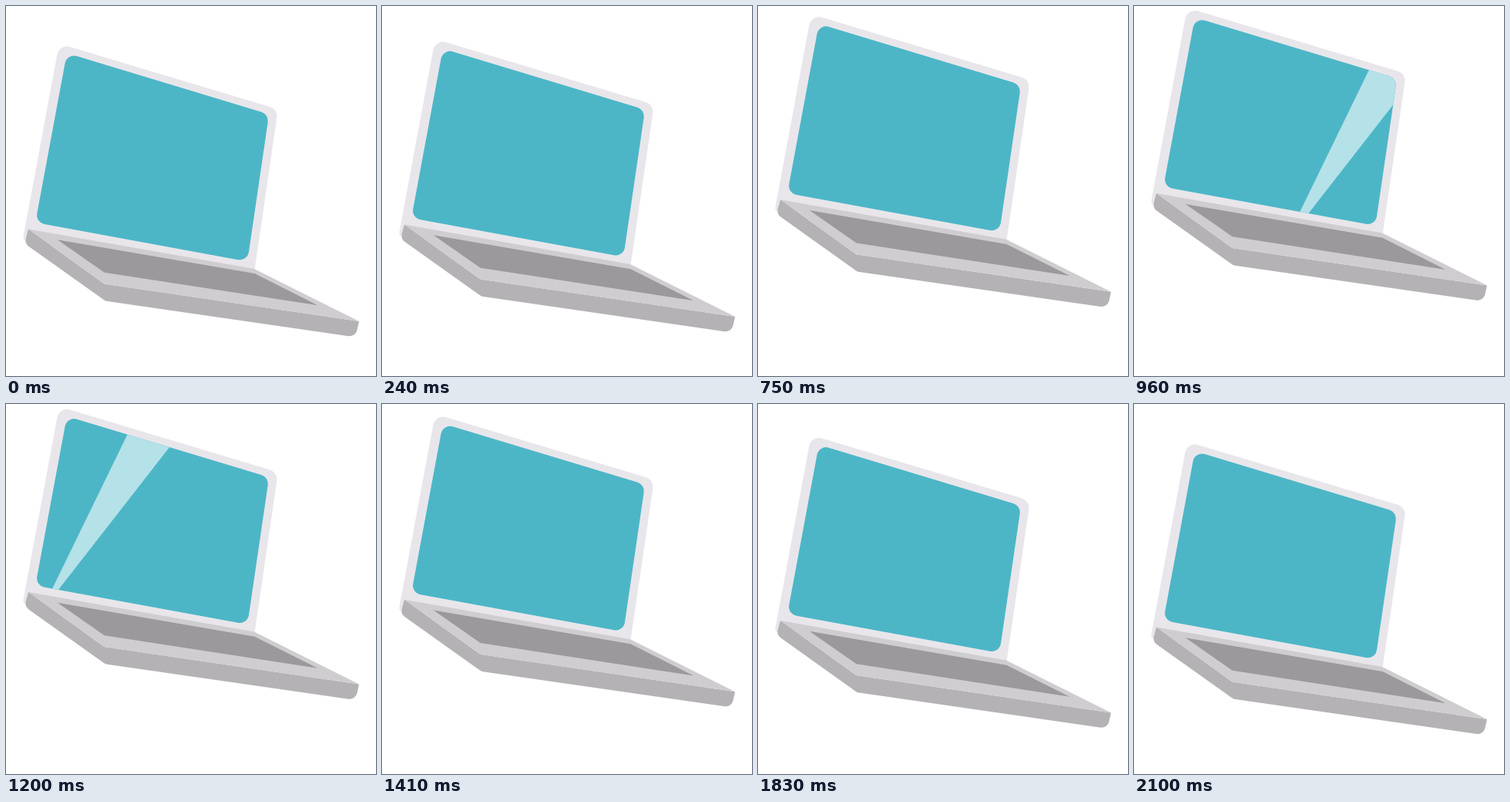
Write an HTML page with a canvas that moves like this. It is 480 by 480 pixels and loops after 2.13 s.

```html
<!DOCTYPE html>
<html lang="en">
<head>
<meta charset="utf-8">
<title>Floating laptop</title>
<style>
html, body { margin: 0; width: 100%; height: 100%; overflow: hidden; background: #fff; }
canvas { display: block; width: 100vmin; height: 100vmin; }
</style>
</head>
<body>
<canvas id="stage" width="480" height="480"></canvas>
<script>
const ctx = document.getElementById('stage').getContext('2d');
const LOOP = 2130, STEP = 30, RISE = 47.4;

const mix = (a, b, t) => a.map((v, i) => v + (b[i] - v) * t);

// Corners of the deck: back left, back right, front right, front left.
const deck = [[29, 289.5], [322, 341], [458, 409], [127.5, 360.5]];
const onDeck = (u, v) =>
  mix(mix(deck[0], deck[3], v), mix(deck[1], deck[2], v), u);
const keys = [onDeck(0.082, 0.135), onDeck(0.94, 0.135),
              onDeck(0.945, 0.735), onDeck(0.082, 0.735)];

const lid = [[69, 48.8], [353, 134], [322, 346], [21.5, 304.5]];
const screen = [[79, 61.2], [341.2, 140.4], [313.2, 331.4], [38.1, 280.9]];
const side = [deck[0], deck[3], deck[2], [453.5, 429.5], [129, 382.7], [24, 308]];

// Outline with rounded corners; radius may differ per corner.
function trace(points, radius = () => 0) {
  const n = points.length;
  ctx.beginPath();
  ctx.moveTo(...mix(points[0], points[n - 1], 0.5));
  points.forEach((p, i) => ctx.arcTo(...p, ...points[(i + 1) % n], radius(i)));
  ctx.closePath();
}

function fill(points, color, radius) {
  trace(points, radius);
  ctx.fillStyle = color;
  ctx.fill();
}

const screenRadius = () => 12;
const lidRadius = i => i < 2 ? 13 : 5;
const sideRadius = i => i < 3 ? 0 : 10;

// A wedge of light whose tip slides along the tilt of the screen.
function drawShine(time) {
  const shift = (time - 960) / 240;
  const x = 194 - 149 * shift, y = 357 - 41 * shift, h = 420;
  ctx.save();
  trace(screen, screenRadius);
  ctx.clip();
  fill([[x, y], [x + h * 0.487, y - h], [x + h * 0.779, y - h]], '#b5e1e8');
  ctx.restore();
}

function draw(time) {
  const lift = RISE * (1 - Math.cos((time + 5) / LOOP * Math.PI * 2)) / 2;
  ctx.fillStyle = '#fff';
  ctx.fillRect(0, 0, 480, 480);
  ctx.save();
  ctx.translate(0, -lift);
  fill(lid, '#e8e6ea', lidRadius);
  fill(screen, '#4cb6c7', screenRadius);
  drawShine(time);
  fill(side, '#b4b2b5', sideRadius);
  fill(deck, '#cfcdd0');
  fill(keys, '#9b999c');
  ctx.restore();
}

const start = performance.now();
function tick() {
  const time = (performance.now() - start) % LOOP;
  draw(Math.floor(time / STEP) * STEP);
  requestAnimationFrame(tick);
}
tick();
</script>
</body>
</html>
```
